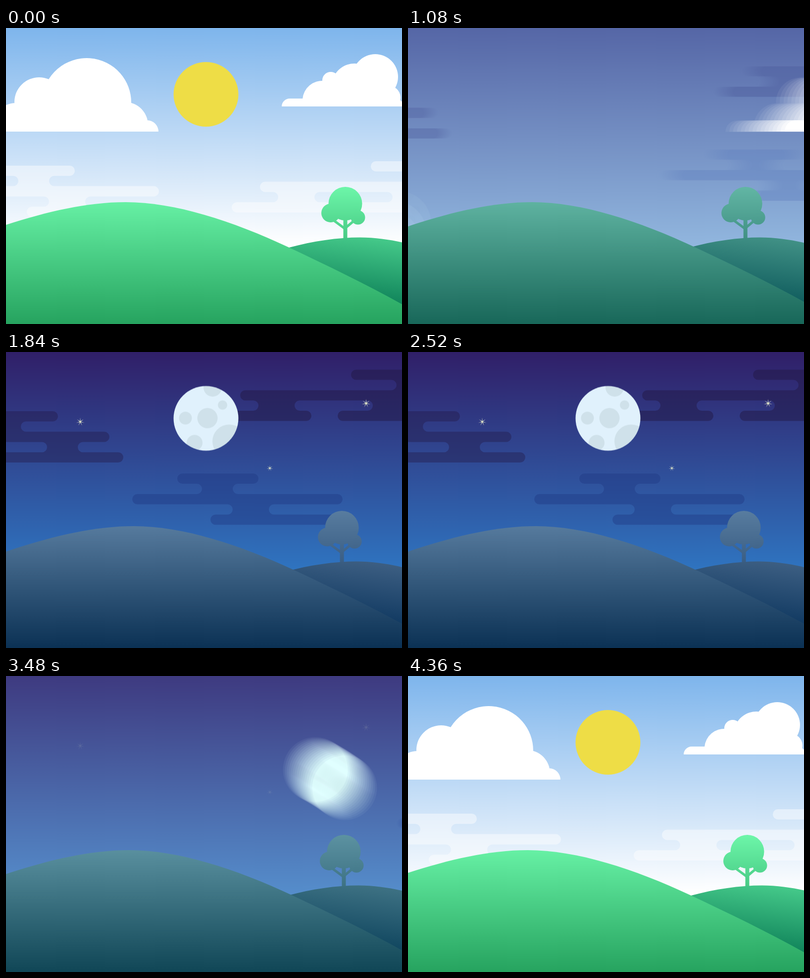
These frames come from a looping animation (800x600 px, 4.4 s). An HTML page with a canvas:

```html
<!DOCTYPE html>
<html lang="en">
<head>
<meta charset="utf-8">
<title>Day and night</title>
<style>
  html, body { margin: 0; width: 100%; height: 100%; overflow: hidden; background: #80b6ed; }
  canvas { display: block; width: 800px; height: 600px; }
</style>
</head>
<body>
<canvas id="stage" width="800" height="600"></canvas>
<script>
const W = 800, H = 600, LOOP = 4400, STEP = 40;
const SHUTTER = 28, SAMPLES = 16;
const DUSK = 1080, DAWN = 3613, MIDNIGHT = 2200;

function makeLayer(w, h) {
  const c = document.createElement('canvas');
  c.width = w;
  c.height = h;
  return c.getContext('2d');
}
const ctx = document.getElementById('stage').getContext('2d');
const layer = makeLayer(W, H);

// ---- Motion rules; s is the time from dusk or dawn ----
const clamp = (v, lo, hi) => Math.min(hi, Math.max(lo, v));
const ease = (t, a, b) => (1 - Math.cos(Math.PI * clamp((t - a) / (b - a), 0, 1))) / 2;

const lean = s => ease(s, -1000, -420);
const rush = s => clamp((s + 400) / 400, 0, 1.3) ** 2.2;
const settle = s => (1 + Math.max(0, s) / 100) ** -2.5 * clamp(1 - s / 760, 0, 1);

const leaveAngle = s => 95 * rush(s) - 7 * lean(s);
const enterAngle = s => -88 * settle(s);
const sunAngle = t => t < MIDNIGHT ? leaveAngle(t - DUSK) : enterAngle(t - DAWN);
const moonAngle = t => t < MIDNIGHT ? enterAngle(t - DUSK) : leaveAngle(t - DAWN);

function orbit(angle) {
  return t => {
    const a = angle(t) * Math.PI / 180;
    return [404 + 472 * Math.sin(a), 606.5 - 472 * Math.cos(a)];
  };
}
// Bright clouds lean back, then rush off to the right and return from the left
function dayDrift(back, lift) {
  return t => {
    if (t >= MIDNIGHT) return [-900 * settle(t - DAWN), 0];
    const s = t - DUSK;
    return [828 * rush(s) - back * lean(s), lift * lean(s) * (1 - Math.min(1, rush(s)))];
  };
}
const duskAway = t => 1 - ease(t, DUSK - 240, DUSK + 240) + ease(t, DAWN - 600, DAWN - 90);
const hazeAway = t => ease(t, DUSK - 380, DUSK - 40) - ease(t, DAWN, DAWN + 480);
const slide = (away, dist, x = 0, y = 0) => t => [x + dist * away(t), y];

const hillShift = t => 7.3 * Math.sin(Math.PI * t / LOOP) ** 1.8;
const nightAt = t => ease(t, DUSK - 290, DUSK + 270) - ease(t, DAWN - 293, DAWN + 277);

// ---- Shapes ----
const ROW = 20.8, R = ROW / 2;

function shape(build) {
  const p = new Path2D();
  build(p);
  return p;
}
function bar(p, x0, x1, y) {
  p.roundRect(x0, y, x1 - x0, ROW, R);
}
// Joint between two bars, with hollow round ends
function joint(p, x0, x1, y) {
  p.moveTo(x0 - R, y);
  p.lineTo(x1 + R, y);
  p.arc(x1 + R, y + R, R, -Math.PI / 2, Math.PI / 2, true);
  p.lineTo(x0 - R, y + ROW);
  p.arc(x0 - R, y + R, R, Math.PI / 2, -Math.PI / 2, true);
  p.closePath();
}
function stack(y, rows) {
  return shape(p => rows.forEach((row, i) => row.forEach(([a, b]) => (i % 2 ? joint : bar)(p, a, b, y + i * ROW))));
}
// Round humps cut off flat at the base
function puff(base, domes, rects) {
  return shape(p => {
    for (const [x, y, r] of domes) {
      const a = Math.asin(Math.min(1, (base - y) / r));
      p.moveTo(x - r * Math.cos(a), y + r * Math.sin(a));
      p.arc(x, y, r, Math.PI - a, 2 * Math.PI + a);
      p.closePath();
    }
    for (const [x, y, w] of rects) p.rect(x, y, w, base - y);
  });
}
function discs(list) {
  return shape(p => list.forEach(([x, y, r]) => {
    p.moveTo(x + r, y);
    p.arc(x, y, r, 0, 2 * Math.PI);
  }));
}

const cloudMid = stack(246.3, [[[346, 510]], [[396, 458]], [[255, 680]], [[458, 531]], [[413, 690]]]);
const cloudRight = stack(35.8, [[[697, 900]], [[789, 850]], [[473, 950]], [[510, 583], [741, 820]], [[416, 617], [670, 880]]]);
const cloudLeft = stack(120, [[[-140, 105]], [[-60, 30]], [[-170, 209]], [[83, 145]], [[-90, 237]]]);
const puffLeft = puff(210,
  [[163, 151, 90], [67, 150, 50], [20, 200, 48], [240, 197, 47], [285, 210, 23], [-62, 210, 23]],
  [[-62, 187, 347], [20, 150, 210]]);
const puffRight = puff(159,
  [[639, 147, 40], [656, 106, 17], [704, 118, 46], [746, 99, 46], [773, 141, 24], [787, 159, 16], [573, 159, 16]],
  [[573, 143, 214], [640, 110, 135]]);
const disc = discs([[0, 0, 65.5]]);
const craters = discs([[3, -.5, 20.5], [33.5, -27, 9.5], [-41.5, -.5, 13], [13.5, -62.5, 18.5], [47, 46.5, 34], [-23, 49.5, 16]]);
const crown = discs([[685.5, 356, 34], [656, 375, 19], [711, 384, 14.5]]);
const branches = new Path2D('M662 390L685 407M704 390L686 405');
const frontHill = new Path2D('M-60 420L0 399C84 372 163 353 242 353C340 353 455 390 572 445C650 482 725 518 800 560L840 583V620H-60Z');
const backHill = new Path2D('M540 453L572 445C620 432 670 424.5 715 424.5C745 424.5 775 429 800 434.5L840 444V620H540Z');
const star = shape(p => {
  for (let i = 0; i < 14; i++) {
    const r = i % 2 ? .16 : 1, a = i * Math.PI / 7 - Math.PI / 2;
    p.lineTo(r * Math.cos(a), r * Math.sin(a));
  }
  p.closePath();
});

// ---- Painting ----
const fill = (path, color) => c => {
  c.fillStyle = color;
  c.fill(path);
};

const moon = makeLayer(140, 140);
moon.translate(70, 70);
fill(disc, '#e0f1fc')(moon);
moon.globalCompositeOperation = 'source-atop';
fill(craters, '#cfe1ea')(moon);
const paintMoon = c => c.drawImage(moon.canvas, -70, -70);

// Draws a moving part, averaged over the open shutter when it is fast
function moving(t, pos, paint, alpha = 1) {
  const [ax, ay] = pos(t - SHUTTER / 2), [bx, by] = pos(t + SHUTTER / 2);
  const n = Math.hypot(bx - ax, by - ay) < 1.5 ? 1 : SAMPLES;
  layer.clearRect(0, 0, W, H);
  for (let i = 0; i < n; i++) {
    layer.save();
    layer.globalCompositeOperation = 'lighter';
    layer.globalAlpha = 1 / n;
    layer.translate(...pos(t + SHUTTER * ((i + .5) / n - .5)));
    paint(layer);
    layer.restore();
  }
  ctx.globalAlpha = alpha;
  ctx.drawImage(layer.canvas, 0, 0);
  ctx.globalAlpha = 1;
}

const mix = ([a, b], k) => `rgb(${a.map((v, i) => Math.round(v + (b[i] - v) * k))})`;
function blend(x0, y0, x1, y1, [top, bottom], k) {
  const g = ctx.createLinearGradient(x0, y0, x1, y1);
  g.addColorStop(0, mix(top, k));
  g.addColorStop(1, mix(bottom, k));
  return g;
}

// Each colour is a [day, night] pair; gradients hold top and bottom
const sky = [[[126, 181, 236], [48, 31, 104]], [[255, 255, 255], [47, 116, 192]]];
const front = [[[102, 240, 164], [86, 122, 157]], [[38, 163, 95], [11, 49, 84]]];
const back = [[[68, 200, 137], [60, 94, 130]], [[18, 134, 92], [15, 56, 96]]];
const leaf = [[[109, 246, 169], [88, 124, 159]], [[72, 203, 133], [58, 94, 132]]];
const highCloud = [[117, 165, 255], [35, 25, 70]];
const lowCloud = [[156, 209, 255], [30, 55, 130]];

function drawStars(alpha) {
  ctx.fillStyle = '#eaeecb';
  for (const [x, y, r] of [[150, 141.5, 8.5], [727.5, 104, 9], [533, 235.5, 6.5]]) {
    ctx.save();
    ctx.globalAlpha = alpha;
    ctx.translate(x, y);
    ctx.scale(r, r);
    ctx.fill(star);
    ctx.restore();
  }
}

function drawLand(t, night) {
  const shift = hillShift(t);
  ctx.save();
  ctx.translate(-shift, 0);
  ctx.fillStyle = ctx.strokeStyle = blend(0, 322, 0, 426, leaf, night);
  ctx.fill(crown);
  ctx.fillRect(681.5, 386, 8, 44);
  ctx.lineWidth = 5;
  ctx.stroke(branches);
  ctx.fillStyle = blend(720, 424, 705, 546, back, night);
  ctx.fill(backHill);
  ctx.restore();

  ctx.save();
  ctx.translate(2.4 * shift, 0);
  ctx.fillStyle = blend(0, 353, 0, 600, front, night);
  ctx.fill(frontHill);
  ctx.restore();
}

function draw(t) {
  const night = nightAt(t);
  const haze = .45 * (1 - night);
  const high = mix(highCloud, night), low = mix(lowCloud, night);

  ctx.fillStyle = blend(0, 0, 0, 440, sky, night);
  ctx.fillRect(0, 0, W, H);

  moving(t, slide(hazeAway, -340, -371, 32.7), fill(cloudMid, '#fff'), haze);
  moving(t, slide(hazeAway, 400, 40, 234.2), fill(cloudRight, '#fff'), haze);
  moving(t, slide(duskAway, -325), fill(cloudLeft, high), .4);
  moving(t, slide(duskAway, 442), fill(cloudRight, high), .5);
  moving(t, slide(duskAway, 550), fill(cloudMid, low), .4);

  drawStars(night ** 10);
  moving(t, orbit(sunAngle), fill(disc, '#eedd46'));
  moving(t, orbit(moonAngle), paintMoon);
  moving(t, dayDrift(43, 8), fill(puffLeft, '#fff'));
  moving(t, dayDrift(35, -3), fill(puffRight, '#fff'));
  drawLand(t, night);
}

function tick() {
  const t = performance.now() % LOOP;
  draw(Math.floor(t / STEP) * STEP);
  requestAnimationFrame(tick);
}
tick();
</script>
</body>
</html>
```
